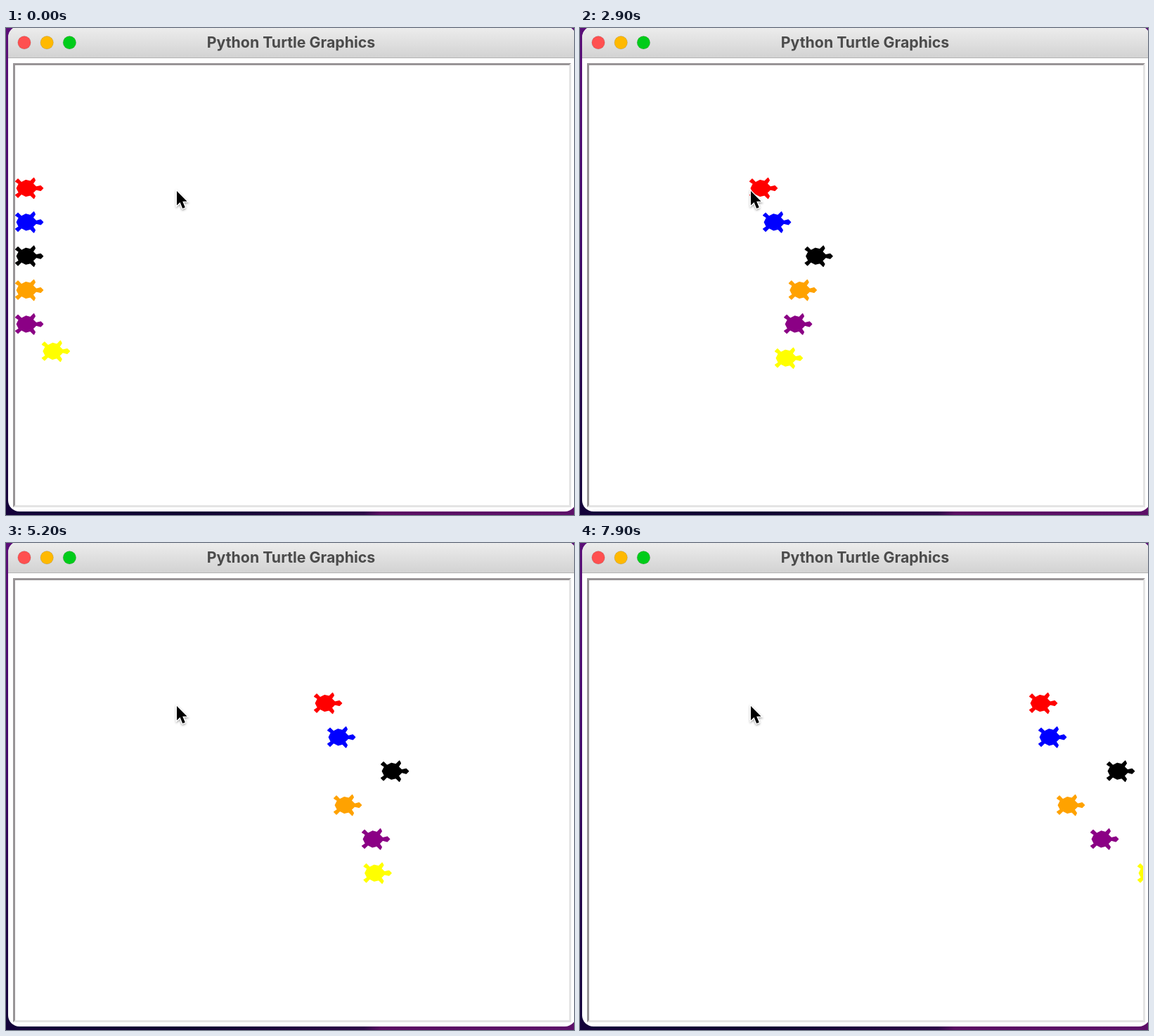
These frames come from a looping animation (808 px wide and 693 px high, 8000 ms). An HTML page:

```html
<!DOCTYPE html>
<html lang="en">
<head>
<meta charset="utf-8">
<title>Turtle race</title>
<style>
  html, body { margin: 0; width: 100%; height: 100%; overflow: hidden; }
  svg { display: block; width: 808px; height: 693px; }
  text { font: 700 21.3px Inter, "Liberation Sans", sans-serif; }
</style>
</head>
<body>
<svg viewBox="0 0 808 693">
  <defs>
    <linearGradient id="side" x2="0" y2="1">
      <stop offset="0" stop-color="#5b0f78"/>
      <stop offset=".45" stop-color="#41086a"/>
      <stop offset=".75" stop-color="#210347"/>
      <stop offset="1" stop-color="#14023a"/>
    </linearGradient>
    <linearGradient id="base">
      <stop offset="0" stop-color="#14023a"/>
      <stop offset=".32" stop-color="#0d0230"/>
      <stop offset=".63" stop-color="#2d0748"/>
      <stop offset=".66" stop-color="#5a0c62"/>
      <stop offset="1" stop-color="#5d1069"/>
    </linearGradient>
    <linearGradient id="bar" x2="0" y2="1">
      <stop offset="0" stop-color="#ececec"/>
      <stop offset="1" stop-color="#d2d2d2"/>
    </linearGradient>
    <clipPath id="window"><rect x="3" y="-2.5" width="808" height="690.5" rx="16"/></clipPath>
    <clipPath id="field"><rect x="12" y="53" width="789" height="626"/></clipPath>
    <filter id="shadow" x="-50%" y="-50%" width="200%" height="200%">
      <feDropShadow dx="0" dy="1.5" stdDeviation="1.5" flood-opacity=".4"/>
    </filter>
  </defs>

  <rect width="808" height="693" fill="url(#side)"/>
  <rect y="670" width="808" height="23" fill="url(#base)"/>
  <g clip-path="url(#window)">
    <rect width="808" height="693" fill="#fff"/>
    <rect width="808" height="43" fill="url(#bar)"/>
    <rect y="42" width="808" height="1" fill="#b4b4b4"/>
  </g>
  <g stroke="#000" stroke-opacity=".12">
    <circle cx="26" cy="20.8" r="9.2" fill="#ff5050"/>
    <circle cx="58.2" cy="20.8" r="9.2" fill="#ffb900"/>
    <circle cx="90.4" cy="20.8" r="9.2" fill="#00cc1a"/>
  </g>
  <text x="405.5" y="27.5" text-anchor="middle" fill="#4b4b4b">Python Turtle Graphics</text>

  <path d="M801 52h3v630H11v-3h790z" fill="#e4e4e4"/>
  <path d="M10 50h794l-3 3H13v626l-3 3z" fill="#989496"/>

  <g id="turtles" clip-path="url(#field)"></g>
  <path d="M243 232v20.3l4.6-4.2 3.6 8.6 3.6-1.5-3.6-8.4h6.4z"
        stroke="#fff" stroke-width="2.4" paint-order="stroke" filter="url(#shadow)"/>
</svg>
<script>
const LOOP = 8000, STEP = 100, GUN = 100;
const UNIT = 1.61, LINE = 26.7, TOP = 228, GAP = 48.35;

// Pixels each turtle covers on every leg; all share the same leg ends.
const legEnds = [1200, 2200, 3500, 4500, 5900, 7900];
const racers = [
  { color: "#ff0000", legs: [90, 76, 115, 74, 140, 131] },
  { color: "#0000ff", legs: [106, 92, 91, 109, 92, 149] },
  { color: "#000000", legs: [136, 114, 105, 89, 152, 140] },
  { color: "#ffa200", legs: [100, 110, 137, 57, 98, 163] },
  { color: "#8b0085", legs: [106, 107, 119, 94, 134, 153] },
  { color: "#ffff00", legs: [115, 87, 115, 111, 135, 217], late: 37.8 }
];

// Half of the turtle's outline, nose to tail, mirrored for the other side.
const half = [[16, 0], [14, 2], [10, 1], [7, 4], [9, 7], [8, 9], [5, 6], [1, 7],
              [-3, 5], [-6, 8], [-8, 6], [-5, 4], [-7, 0]];
const outline = [...half, ...half.map(([x, y]) => [x, -y]).reverse()];

const group = document.getElementById("turtles");
for (const racer of racers) {
  racer.shape = document.createElementNS("http://www.w3.org/2000/svg", "polygon");
  const attrs = { points: outline.join(" "), fill: racer.color, stroke: racer.color,
                  "stroke-linejoin": "round" };
  for (const name in attrs) racer.shape.setAttribute(name, attrs[name]);
  group.append(racer.shape);
}

const clamp = k => Math.min(1, Math.max(0, k));

function distance(legs, t) {
  return legs.reduce((sum, leg, i) => {
    const from = legEnds[i - 1] ?? GUN;
    return sum + leg * clamp((t - from) / (legEnds[i] - from));
  }, 0);
}

function draw(t) {
  racers.forEach(({ shape, legs, late = 0 }, row) => {
    // A late turtle glides down to its starting line before the gun.
    const glide = late * clamp(1 - t / GUN);
    const x = LINE + distance(legs, t) + glide;
    const y = TOP + GAP * row - glide * 0.26;
    shape.setAttribute("transform", `translate(${x} ${y}) scale(${UNIT})`);
  });
}

const start = performance.now();
function tick() {
  const t = (performance.now() - start) % LOOP;
  draw(Math.floor(t / STEP) * STEP);
  requestAnimationFrame(tick);
}
tick();
</script>
</body>
</html>
```
